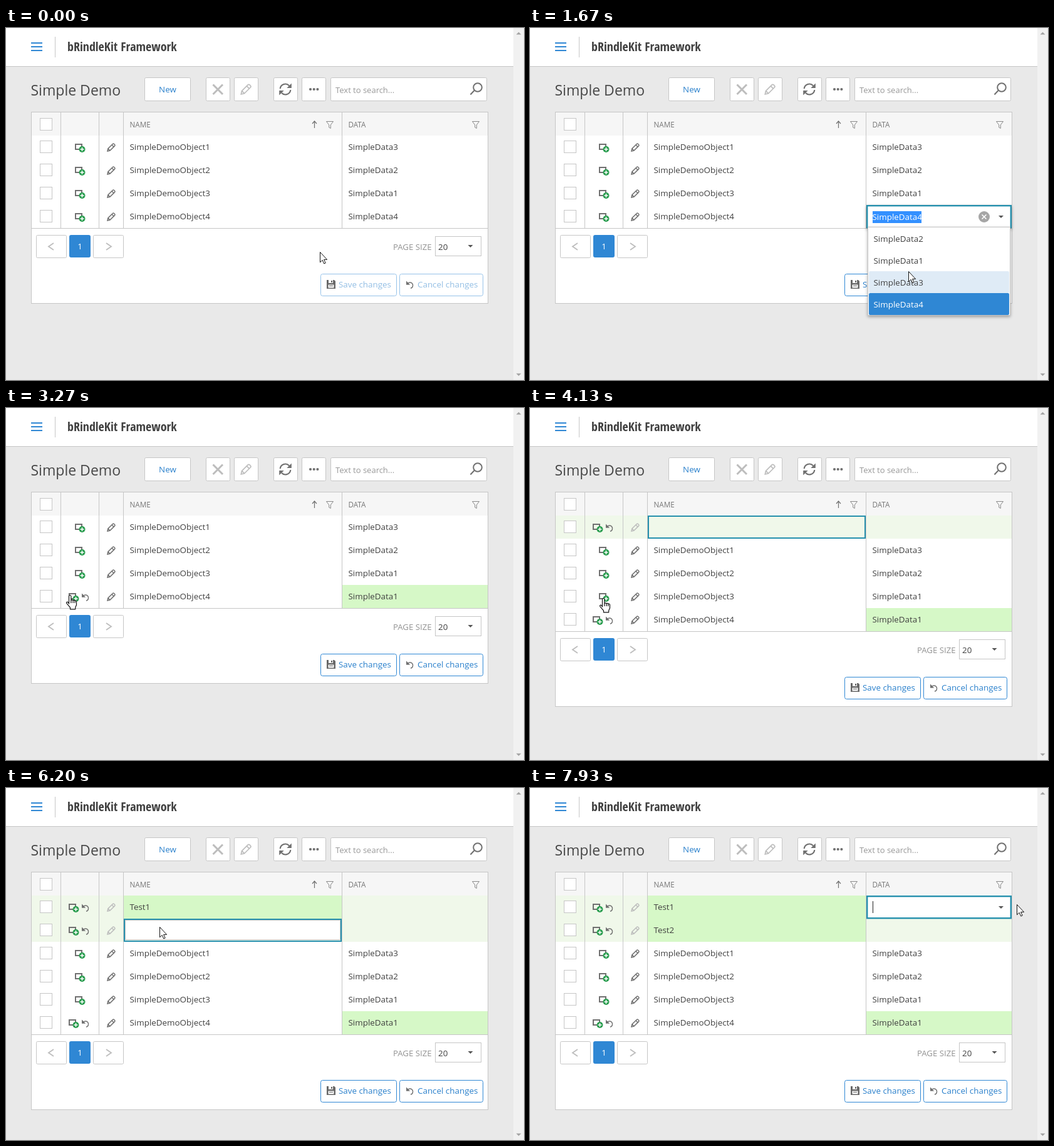
These frames come from a looping animation (827 px wide and 563 px high, 8000 ms). An HTML page:

```html
<!DOCTYPE html>
<html lang="en">
<head>
<meta charset="utf-8">
<title>Batch editing demo</title>
<style>
  html, body { margin: 0; width: 100%; height: 100%; overflow: hidden; background: #e9e9e9; }
  svg { display: block; width: 827px; height: 563px; }
  text { font: 13.4px "Open Sans", "Noto Sans", sans-serif; fill: #404040; white-space: pre; }
  .title { font: 700 20px "Open Sans Condensed", "Open Sans", "Noto Sans", sans-serif; font-stretch: 75%; }
  .h1 { font-size: 23px; fill: #484848; }
  .head { font-size: 11.7px; fill: #777; }
  .hint { font-size: 13px; fill: #999; }
  .blue { fill: #2a80cc; }
  .mid { text-anchor: middle; }
  .inv { fill: #fff; }
  .box { fill: #fff; stroke: #c6c6c6; }
  .line { fill: none; stroke: #c6c6c6; }
  .ink { fill: none; stroke: #707070; stroke-width: 1.5; }
  .pale { stroke: #bdbdbd; }
  .gray { fill: #707070; }
  .dirty { fill: #d6f8c7; }
  .fresh { fill: #f0f8ea; }
  .focus { fill: none; stroke: #2590ad; stroke-width: 2; }
  .action { fill: #fff; stroke: #2f87d4; }
</style>
</head>
<body>
<svg viewBox="0 0 827 563">
  <defs>
    <filter id="shadow" x="-10%" y="-10%" width="120%" height="130%">
      <feDropShadow dx="0" dy="2" stdDeviation="2.5" flood-opacity=".35"/>
    </filter>
    <path id="pencil" d="M1 13l.9-4L9.4 1.5a1.5 1.5 0 0 1 2.1 0l1 1a1.5 1.5 0 0 1 0 2.1L5 12.1zM8 3l3 3M2 9l3 3"/>
    <path id="funnel" d="M.5.5h11L7.3 6v5.5L4.7 10V6z" class="ink" style="stroke-width:1;stroke:#8a8a8a"/>
    <path id="down" d="M-4-2h8l-4 4z" fill="#555"/>
    <g id="undo">
      <path class="gray" d="M0 .5v6.2h6.2z"/>
      <path class="ink" stroke-width="2" d="M2.5 4.5A4.7 4.7 0 1 1 7 12.3"/>
    </g>
    <g id="add">
      <path class="ink" style="stroke-width:2" d="M7 9H1V1h10v4"/>
      <circle cx="11.5" cy="9" r="5" fill="#2a9d4f"/>
      <path d="M8.5 9h6m-3-3v6" stroke="#fff" stroke-width="1.5"/>
    </g>
    <g id="turn">
      <path class="ink" style="stroke-width:2.2" d="M-8.3-1A8.3 8.3 0 0 1 6-5.8"/>
      <path class="gray" d="M9.8-9.5V-2H2.3z"/>
    </g>
    <g id="dataEditor">
      <rect x="538" y="1" width="230" height="35" fill="#fff"/>
      <rect class="focus" x="538.2" y="1.2" width="229.6" height="35" style="stroke-width:2.4"/>
    </g>
    <g id="nameInput">
      <rect x="190.5" y="2.5" width="343" height="31" class="box"/>
    </g>
    <rect id="nameFocus" class="focus" x="189" y="1" width="346" height="35"/>
  </defs>

  <!-- page frame -->
  <path fill="#e9e9e9" d="M0 0h827v563H0z"/>
  <path fill="#fff" d="M0 0h810v61H0z"/>
  <path class="line" d="M0 61.5h810M78.5 14v33"/>
  <path stroke="#2f87d4" stroke-width="2" d="M40 24h18M40 30h18M40 36h18"/>
  <text class="title" x="98" y="37">bRindleKit Framework</text>
  <path fill="#f1f1f1" d="M810 0h17v563h-17z"/>
  <path fill="#a3a3a3" d="M814.5 10.5h8l-4-4zM814.5 552.5h8l-4 4z"/>

  <!-- toolbar -->
  <text class="h1" x="39.5" y="108">Simple Demo</text>
  <g class="box">
    <rect x="221.5" y="79.5" width="73" height="37" rx="2"/>
    <rect x="319.5" y="79.5" width="38" height="37" rx="2"/>
    <rect x="364.5" y="79.5" width="38" height="37" rx="2"/>
    <rect x="427.5" y="79.5" width="38" height="37" rx="2"/>
    <rect x="472.5" y="79.5" width="38" height="37" rx="2"/>
    <rect x="518.5" y="79.5" width="249" height="37" rx="2"/>
  </g>
  <text class="blue mid" x="258" y="103">New</text>
  <path class="ink pale" style="stroke-width:3" d="M330.5 90.5l15.5 15.5m0-15.5l-15.5 15.5"/>
  <use href="#pencil" class="ink pale" style="stroke-width:1.3" transform="translate(374 89) scale(1.3)"/>
  <use href="#turn" x="446" y="98"/>
  <use href="#turn" transform="translate(446 98) rotate(180)"/>
  <g class="gray"><circle cx="486" cy="98" r="2.1"/><circle cx="491.7" cy="98" r="2.1"/><circle cx="497.4" cy="98" r="2.1"/></g>
  <text class="hint" x="526" y="104">Text to search...</text>
  <path class="ink" style="stroke-width:2" d="M747.5 100l-6 6.5"/>
  <circle class="ink" style="stroke-width:2" cx="753" cy="95" r="6.8"/>

  <!-- grid -->
  <rect id="frame" class="box" x="40.5" y="134.5" width="729"/>
  <path fill="#f6f6f6" d="M41 135h728v37H41z"/>
  <g id="fills">
    <path class="fresh" data-at="3600" d="M41 172h728v37H41z"/>
    <path class="fresh" data-at="4200" d="M41 209h728v37H41z"/>
    <path class="dirty" data-at="6130" d="M188 172h348v37H188z"/>
    <path class="dirty" data-at="7600" d="M188 209h348v37H188z"/>
    <path class="dirty moves" data-at="2270" d="M537 283h232v37H537z"/>
  </g>
  <path id="columns" class="line"/>
  <rect class="box" x="54.5" y="144.5" width="19" height="19"/>
  <text class="head" x="197.5" y="158.5">NAME</text>
  <text class="head" x="546.5" y="158.5">DATA</text>
  <path class="ink" style="stroke-width:1.2" d="M492.5 160v-11m-3.5 4l3.5-4 3.5 4"/>
  <use href="#funnel" x="511" y="149"/>
  <use href="#funnel" x="744" y="149"/>
  <g id="fresh"></g>
  <g id="rows" class="moves"></g>

  <!-- footer -->
  <g class="moves">
    <path class="line" d="M41 320.5h728"/>
    <rect class="box" x="48.5" y="331.5" width="48" height="36" rx="2"/>
    <rect class="box" x="139.5" y="331.5" width="48" height="36" rx="2"/>
    <path class="ink pale" style="stroke-width:1.8" d="M76 344l-8 5.5 8 5.5M160 344l8 5.5-8 5.5"/>
    <rect x="101" y="331" width="34" height="36" rx="3" fill="#2f87d4"/>
    <text class="inv mid" x="118" y="354">1</text>
    <text x="618" y="355" style="fill:#929292;font-size:13.2px">PAGE SIZE</text>
    <rect class="box" x="685.5" y="333.5" width="73" height="31"/>
    <text x="690" y="355">20</text>
    <use href="#down" x="741.5" y="349"/>
    <g id="actions">
      <rect class="action" x="502.5" y="393.5" width="121" height="35" rx="3"/>
      <rect class="action" x="628.5" y="393.5" width="133" height="35" rx="3"/>
      <text class="blue" x="531" y="415">Save changes</text>
      <text class="blue" x="657" y="415">Cancel changes</text>
    </g>
    <path fill="#686868" fill-rule="evenodd" d="M512 403h12l2 2v12h-14zM515 403v5h7v-5zM514.5 410.500v5h9v-5zM519 404h2v3h-2zM516 412h6v1h-6z"/>
    <use href="#undo" x="639" y="404"/>
  </g>

  <!-- editing of the last row -->
  <g data-at="530-2270">
    <use href="#dataEditor" y="283" filter="url(#shadow)"/>
    <path data-at="1330-2000" fill="#3390ff" d="M547 293h78v19h-78z"/>
    <path id="arrowHover" data-at="950-1400" fill="#d3d3d3" d="M737 285h30v33h-30z"/>
    <path data-at="950-1400" stroke="#b8b8b8" d="M737.5 285v33"/>
    <text data-at="530-1330" x="546.5" y="307">SimpleData4</text>
    <text data-at="1330-2000" class="inv" x="546.5" y="307">SimpleData4</text>
    <text data-at="2000-2270" x="546.5" y="307">SimpleData1</text>
    <circle cx="725" cy="302" r="9" fill="#a6a6a6"/>
    <path stroke="#fff" stroke-width="1.6" d="M721.500 298.500l7 7m0-7l-7 7"/>
    <use href="#down" x="752" y="302"/>
  </g>
  <g data-at="1270-2000">
    <rect class="box" x="539.500" y="318.500" width="227" height="141" filter="url(#shadow)"/>
    <rect id="hover" x="541" width="224" height="35" rx="2" fill="#dfebf6"/>
    <rect x="541" y="424" width="224" height="35" rx="2" fill="#2f87d4"/>
    <text x="548.500" y="342">SimpleData2</text>
    <text x="548.500" y="377">SimpleData1</text>
    <text x="548.500" y="412">SimpleData3</text>
    <text class="inv" x="548.500" y="447">SimpleData4</text>
  </g>

  <!-- editing of the added rows -->
  <use href="#nameInput" y="172" data-at="3670-4000"/>
  <use href="#nameInput" y="172" data-at="4270-6130"/>
  <use href="#nameFocus" y="172" data-at="3600-6130"/>
  <g data-at="6130-7600"><use href="#nameInput" y="209"/><use href="#nameFocus" y="209"/></g>
  <rect class="focus" x="538" y="173" width="230" height="35" data-at="7670"/>
  <g data-at="7730"><use href="#dataEditor" y="172"/><use href="#down" x="752" y="191"/></g>
  <path data-at="7800" stroke="#222" d="M547.5 181v19"/>
  <text id="typed1" x="197.5" y="195"></text>
  <text id="typed2" x="197.5" y="232"></text>
  <path id="caret1" data-at="4330-6130" stroke="#222" d="M.5 181v19"/>
  <path id="caret2" data-at="6330-7600" stroke="#222" d="M.5 218v19"/>

  <g id="cursor" fill="#fff" stroke="#111" stroke-linejoin="round">
    <path id="arrow" d="M.5.5v16.300l3.700-3.500 2.600 5.700 2.400-1.100-2.600-5.500h5z"/>
    <path id="hand" stroke-width="1.200" d="M-1.500 13V1.200a1.700 1.700 0 0 1 3.400 0V8c.3-1.500 3-1.400 3.200.2.300-1.200 2.700-1 2.900.6.400-1 2.500-.8 2.500 1v5.200L8.700 19v2.800H.5v-2.600L-5 12.700c-1.300-1.800.7-3.300 2-2zM1.900 8v4M5.100 8.500V12M8 9v3"/>
  </g>
</svg>
<script>
const LOOP = 8000, STEP = 1000 / 15;
const $ = id => document.getElementById(id);

const tools = (x, y, undo) => `<use href="#add" x="${x}" y="${y + 13}"/>` +
  (undo ? `<use href="#undo" x="${x + 21}" y="${y + 13}"/>` : '');
const base = (y, pale) => `<rect class="box" x="54.5" y="${y + 8.5}" width="19" height="19"/>
  <use href="#pencil" class="ink ${pale}" x="161" y="${y + 12}"/>`;
const label = (x, y, s, at = '0') => `<text x="${x}" y="${y + 23}" data-at="${at}">${s}</text>`;

$('rows').innerHTML = [3, 2, 1, 4].map((n, i) => {
  const y = 172 + 37 * i, last = i === 3;
  const data = last
    ? label(546.5, y, 'SimpleData4', '0-530') + label(546.5, y, 'SimpleData1', '2270')
    : label(546.5, y, 'SimpleData' + n);
  const icons = last
    ? `<g data-at="0-2270">${tools(110, y)}</g><g data-at="2270">${tools(100, y, true)}</g>`
    : tools(110, y);
  return base(y, '') + icons + label(197.5, y, 'SimpleDemoObject' + (i + 1)) + data;
}).join('');

$('fresh').innerHTML = [[172, 3600], [209, 4200]].map(([y, at]) =>
  `<g data-at="${at}">${base(y, 'pale')}${tools(100, y, true)}</g>`).join('');

const timed = [...document.querySelectorAll('[data-at]')].map(el => {
  const [from, to = LOOP + 100] = el.dataset.at.split('-').map(Number);
  return { el, from, to };
});
const movers = document.querySelectorAll('.moves');

// time, x, y of the pointer tip
const path = [
  [0, 501, 358], [10, 501, 358], [330, 650, 302], [600, 650, 302], [1000, 748, 305],
  [1330, 748, 305], [1670, 604, 389], [1870, 588, 371], [2000, 588, 371], [2200, 444, 384],
  [2400, 444, 384], [3070, 102, 300], [3330, 102, 300], [3900, 117, 305], [4430, 117, 305],
  [5200, 245, 222], [7000, 245, 222], [7600, 705, 190], [7670, 705, 190], [7930, 777, 186], [8100, 777, 186]
];
const keys = [
  ['Test1', [5070, 5470, 5530, 5670, 5870]],
  ['Test2', [6470, 6600, 6730, 6870, 7000]]
];

function tipAt(t) {
  const i = path.findIndex(p => p[0] > t), [t0, x0, y0] = path[i - 1], [t1, x1, y1] = path[i];
  const k = (t - t0) / (t1 - t0);
  return [Math.round(x0 + (x1 - x0) * k), Math.round(y0 + (y1 - y0) * k)];
}

function draw(ms) {
  const t = Math.floor((ms % LOOP + 4) / STEP) * STEP + 4;
  // nested windows only hide, so children never outlive their group
  for (const { el, from, to } of timed) el.style.display = t >= from && t < to ? '' : 'none';

  const dy = t < 3600 ? 0 : t < 4200 ? 37 : 74;
  movers.forEach(el => el.setAttribute('transform', `translate(0 ${dy})`));
  $('frame').setAttribute('height', 306 + dy);
  $('columns').setAttribute('d', [87.5, 148.5, 187.5, 536.5].map(x => `M${x} 135V${320 + dy}`).join(''));
  $('actions').setAttribute('opacity', t < 530 ? 0.5 : 1);

  keys.forEach(([word, times], i) => {
    const text = $('typed' + (i + 1));
    text.textContent = word.slice(0, times.filter(at => at <= t).length);
    const x = Math.round(197 + text.getComputedTextLength());
    $('caret' + (i + 1)).setAttribute('transform', `translate(${x} 0)`);
  });

  const [x, y] = tipAt(t);
  const hand = t >= 930 && t < 1400 || t >= 3000 && t < 4530;
  $('cursor').setAttribute('transform', `translate(${x} ${y})`);
  $('arrow').style.display = hand ? 'none' : '';
  $('hand').style.display = hand ? '' : 'none';

  const item = Math.floor((y - 319) / 35);
  $('hover').style.display = x > 540 && x < 766 && item >= 0 && item < 3 ? '' : 'none';
  $('hover').setAttribute('y', 319 + 35 * item);
}

const start = performance.now();
function tick() {
  draw(performance.now() - start);
  requestAnimationFrame(tick);
}
draw(0);
requestAnimationFrame(tick);
</script>
</body>
</html>
```
